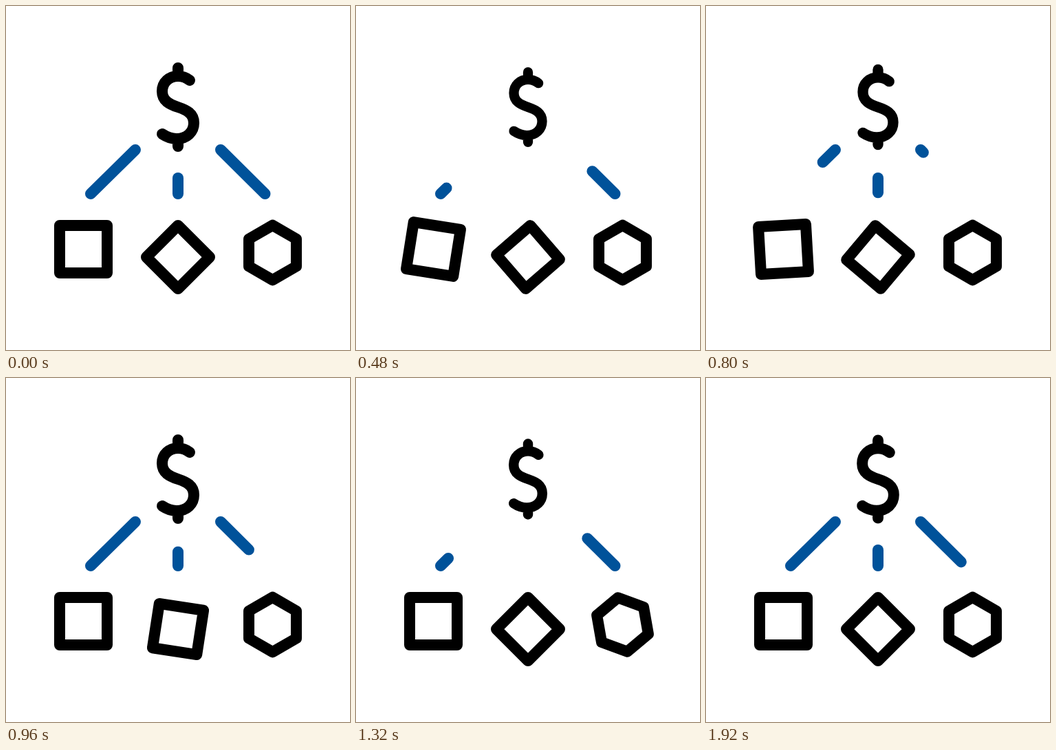
Write an HTML page with a canvas that moves like this. It is 500 px wide and 500 px high and loops after 1960 ms.

```html
<!DOCTYPE html>
<html lang="en">
<head>
<meta charset="utf-8">
<title>Asset allocation</title>
<style>
html, body { margin: 0; height: 100%; overflow: hidden; background: #fff; }
canvas { display: block; }
</style>
</head>
<body>
<canvas id="stage" width="500" height="500"></canvas>
<script>
const ctx = document.getElementById('stage').getContext('2d');
const LOOP = 1960, STEP = 40, TURN = 880;
const BLACK = '#000', BLUE = '#00529a';

const polygon = (sides, radius, turn) => {
  const path = new Path2D();
  for (let i = 0; i < sides; i++) {
    const a = turn + i * 2 * Math.PI / sides;
    path.lineTo(radius * Math.cos(a), radius * Math.sin(a));
  }
  path.closePath();
  return path;
};

const dollar = new Path2D(
  'M17-39C12-43 6-45 0-45C-13-45-23-36-23-23C-23-9-12-4 0 0' +
  'C12 4 23 9 23 23C23 36 13 46-2 46C-10 46-17 43-23 39M0-57V-45M0 46V57');

const shapes = [
  { x: 112.5, y: 353.5, start: 18, path: polygon(4, 48.8, Math.PI / 4) },
  { x: 250, y: 365, start: 372, path: polygon(4, 46, 0) },
  { x: 387.5, y: 358.5, start: 984, path: polygon(6, 39.8, Math.PI / 6) }
];

// Each cycle: [start of shrinking, start of growing]
const lines = [
  { from: [188, 209], to: [123, 273], out: 370, back: 290, cycles: [[244, 646], [1103, 1570]] },
  { from: [250, 250], to: [250, 273], out: 200, back: 210, cycles: [[83, 598], [948, 1461]] },
  { from: [312, 209], to: [376.5, 273], out: 370, back: 290, cycles: [[375, 729], [1242, 1643]] }
];

// Scale of the dollar sign: [time, scale]
const pulse = [[0, 1], [150, 1], [560, 0.881], [970, 1], [1500, 0.87], [1990, 1]];

const clamp = v => Math.min(1, Math.max(0, v));
const mix = (a, b, p) => a + (b - a) * p;
const wave = p => (1 - Math.cos(Math.PI * p)) / 2;

// Equals cubic-bezier(.5, 0, .5, 1)
function ease(x) {
  const u = clamp(x) - 0.5;
  let e = u;
  for (let i = 0; i < 6; i++) e -= (0.75 * e + e ** 3 - u) / (0.75 + 3 * e * e);
  return 0.5 + 1.5 * e - 2 * e ** 3;
}

function pulseAt(t) {
  const i = pulse.findIndex(key => key[0] > t);
  const [t0, a] = pulse[i - 1], [t1, b] = pulse[i];
  return mix(a, b, wave((t - t0) / (t1 - t0)));
}

function stroke(path, x, y, scale, angle) {
  ctx.save();
  ctx.translate(x, y);
  ctx.rotate(angle);
  ctx.scale(scale, scale);
  ctx.stroke(path);
  ctx.restore();
}

function drawLine({ from, to, out, back, cycles }, t) {
  const [shrink, grow] = t < cycles[1][0] ? cycles[0] : cycles[1];
  let head = 0, tail = 1;
  if (t < grow) head = 1 - (1 - clamp((t - shrink) / out)) ** 2;
  else tail = clamp((t - grow) / back) ** 2;
  if (head >= 1) return;
  const at = p => [mix(from[0], to[0], p), mix(from[1], to[1], p)];
  ctx.beginPath();
  ctx.moveTo(...at(head));
  ctx.lineTo(...at(Math.max(tail, 0.002)));
  ctx.stroke();
}

function draw(now) {
  const t = Math.floor(now % LOOP / STEP) * STEP;
  ctx.fillStyle = '#fff';
  ctx.fillRect(0, 0, 500, 500);
  ctx.lineWidth = 16;
  ctx.lineCap = ctx.lineJoin = 'round';
  ctx.strokeStyle = BLUE;
  lines.forEach(line => drawLine(line, t));
  ctx.strokeStyle = BLACK;
  stroke(dollar, 250, 147, pulseAt(t), 0);
  for (const { x, y, start, path } of shapes) {
    stroke(path, x, y, 1, Math.PI * ease((t - start) / TURN));
  }
}

const begin = performance.now();
function tick() {
  draw(performance.now() - begin);
  requestAnimationFrame(tick);
}
tick();
</script>
</body>
</html>
```
